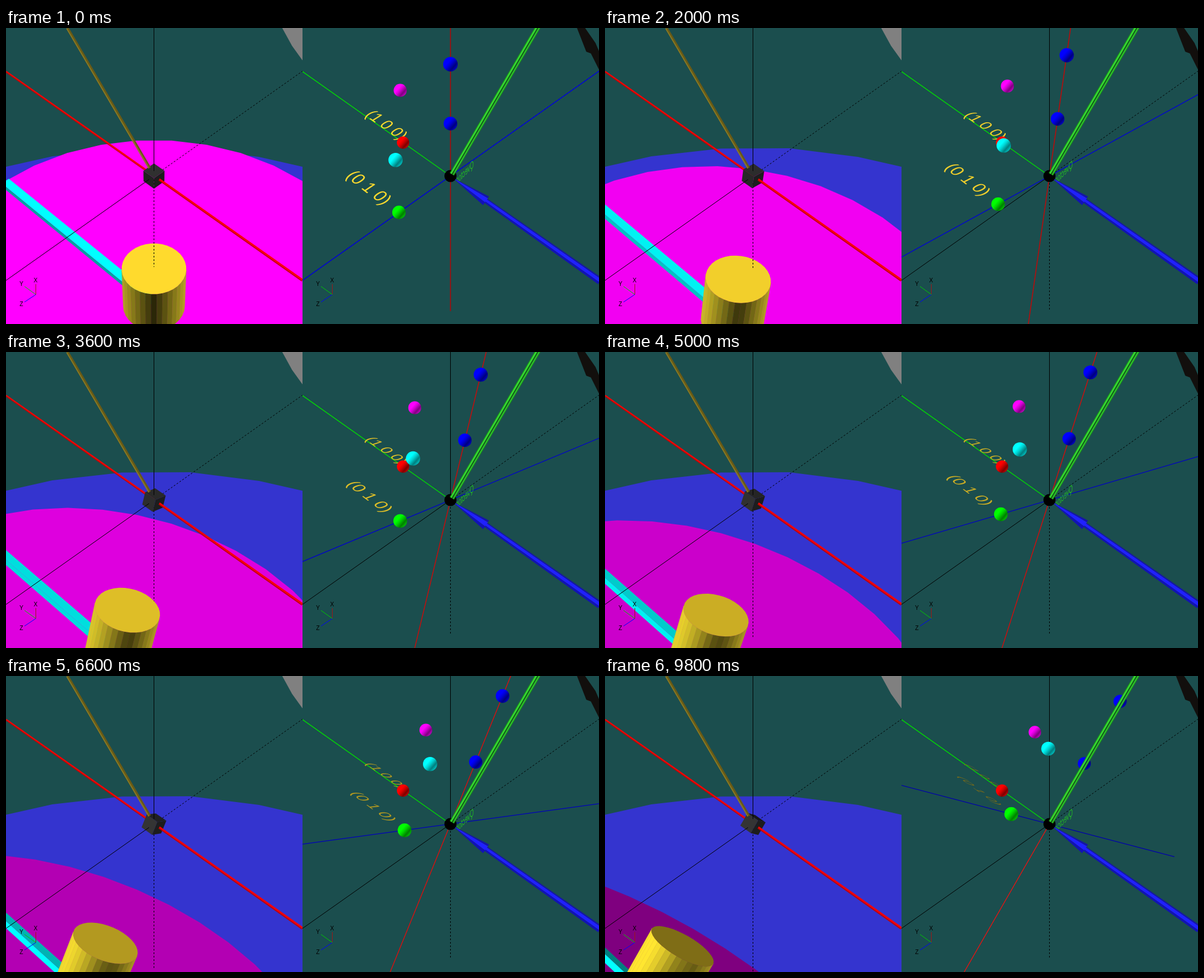
An HTML page with a canvas that plays this animation: 1024x512 px, repeating every 10000 ms.

```html
<!DOCTYPE html>
<html lang="en">
<head>
<meta charset="utf-8">
<title>Rotating frames</title>
<style>
html, body { margin: 0; width: 100%; height: 100%; overflow: hidden; background: #1b4e4e; }
canvas { display: block; width: 1024px; height: 512px; }
</style>
</head>
<body>
<canvas id="stage" width="1024" height="512"></canvas>
<script>
const g = document.getElementById('stage').getContext('2d');
const FOCAL = 1447, DIST = 12, H = Math.SQRT1_2, SIDES = 36;
const STEP = 200, STEPS = 50, STEP_DEG = 0.9;
const FONT = '"Liberation Sans", Arial, sans-serif';
const GOLD = [255, 218, 45];
let cx = 256, sin = 0, cos = 1;

// X points up, Y up-left away from the viewer, Z down-left towards the viewer
const depth = ([x, y, z]) => DIST - (H * x - y / 2 + z / 2);
function project(p) {
  const [x, y, z] = p, k = FOCAL / depth(p);
  return [cx - H * (y + z) * k, 256 - (H * x + (y - z) / 2) * k];
}
// turn a point about the Y axis
const turn = (x, y, z) => [x * cos + z * sin, y, z * cos - x * sin];
const spin = (x, y, z) => project(turn(x, y, z));
const shade = (rgb, k) => `rgb(${rgb.map(v => Math.round(v * Math.min(1, Math.max(0, k))))})`;

function poly(points, fill) {
  g.beginPath();
  points.forEach(p => g.lineTo(p[0], p[1]));
  g.closePath();
  g.fillStyle = fill;
  g.fill();
}
function line(a, b, color, width = 1, dash = []) {
  g.beginPath();
  g.setLineDash(dash);
  g.moveTo(a[0], a[1]);
  g.lineTo(b[0], b[1]);
  g.strokeStyle = color;
  g.lineWidth = width;
  g.stroke();
  g.setLineDash([]);
}
// round bar between two screen points, each with its own half width
function bar(a, b, ra, rb, layers) {
  const len = Math.hypot(b[0] - a[0], b[1] - a[1]);
  const nx = (a[1] - b[1]) / len, ny = (b[0] - a[0]) / len;
  for (const [from, to, color] of layers) {
    const at = (p, r, k) => [p[0] + nx * r * k, p[1] + ny * r * k];
    poly([at(a, ra, from), at(b, rb, from), at(b, rb, to), at(a, ra, to)], color);
  }
}
const axis = (a, b, dash) => line(project(a), project(b), '#000', 1, dash ? [3, 3] : []);

function panel(x, draw) {
  g.save();
  g.beginPath();
  g.rect(x, 0, 512, 512);
  g.clip();
  cx = x + 255.5;
  draw();
  triad(x);
  g.restore();
}
function triad(x) {
  const o = [x + 51.5, 461];
  line(o, [x + 51.5, 443], '#a01818');
  line(o, [x + 32, 447], '#0c0');
  line(o, [x + 32, 474], '#00f');
  g.fillStyle = '#000';
  g.font = '10px ' + FONT;
  g.textAlign = 'center';
  g.textBaseline = 'middle';
  g.fillText('X', x + 51, 437);
  g.fillText('Y', x + 26.5, 443.5);
  g.fillText('Z', x + 26.5, 478.5);
}

const topLight = () => 0.345 + 0.69 * cos - 0.49 * sin;
const sideLight = () => 0.27 + 0.9 * sin + 0.36 * cos;
function ring(x, r) {
  return Array.from({ length: SIDES }, (_, i) => {
    const a = i * 2 * Math.PI / SIDES;
    return [x, r * Math.cos(a), r * Math.sin(a)];
  });
}

function cylinder(top, bottom, r) {
  const up = ring(top, r), low = ring(bottom, r);
  for (let i = 0; i < SIDES; i++) {
    const j = (i + 1) % SIDES, a = (i + 0.5) * 2 * Math.PI / SIDES;
    const n = turn(0, Math.cos(a), Math.sin(a));
    const p = turn(top, r * Math.cos(a), r * Math.sin(a));
    const eye = [DIST * H - p[0], -DIST / 2 - p[1], DIST / 2 - p[2]];
    if (n[0] * eye[0] + n[1] * eye[1] + n[2] * eye[2] <= 0) continue;
    const left = Math.max(0, 0.69 * n[0] + 0.39 * (n[1] + n[2]));
    const right = Math.max(0, -0.39 * (n[1] + n[2]));
    const color = shade([255, 230, 48], 0.17 + left + right);
    const quad = [up[i], up[j], low[j], low[i]].map(q => spin(...q));
    poly(quad, color);
    g.strokeStyle = color;
    g.lineWidth = 0.5;
    g.stroke();
  }
  poly(up.map(q => spin(...q)), shade(GOLD, topLight()));
}

function cube(e) {
  const face = (pts, k) => poly(pts.map(p => spin(...p.map(v => v * e))), shade([52, 52, 52], k));
  face([[1, 1, 1], [1, -1, 1], [-1, -1, 1], [-1, 1, 1]], sideLight());
  face([[1, -1, 1], [1, -1, -1], [-1, -1, -1], [-1, -1, 1]], 0.55);
  face([[1, 1, 1], [1, 1, -1], [1, -1, -1], [1, -1, 1]], topLight() * 0.9);
}

function solids() {
  const PLATE = 3.09;
  poly([[477, 0], [512, 0], [512, 56], [494, 31]], '#808080');
  poly([[0, 240], [80, 222], [200, 208.5], [318, 208], [437, 223], [512, 240], [512, 512], [0, 512]], '#3434cf');
  poly(ring(-PLATE, 4.13).map(q => spin(...q)), shade([255, 0, 255], topLight()));

  const [top, low, len, w] = [-3, -3.11, 4.05, 0.085];
  poly([spin(top, 0, w), spin(top, len, w), spin(low, len, w), spin(low, 0, w)], shade([0, 255, 255], sideLight()));
  poly([spin(top, 0, w), spin(top, len, w), spin(top, len, -w), spin(top, 0, -w)], shade([0, 255, 255], topLight()));

  // the lower axis pierces the lid while the tilt is small, the plate afterwards
  const lid = 2.1 * sin / cos < 0.52;
  const drop = () => axis([0, 0, 0], [-(lid ? 2.07 : PLATE) / cos, 0, 0], true);
  if (!lid) drop();
  cylinder(-2.1, -PLATE, 0.52);
  if (lid) drop();

  axis([0, 0, 0], [0, 0, -8.2], true);
  const rod = [[-1, 0.3, '#f00'], [0.3, 1, '#c40000']];
  bar([0, 75.5], [256, 256], 1.6, 1.9, rod);
  cube(0.106);
  axis([0.1, 0, 0], [4, 0, 0]);
  axis([0, 0, 0.1], [0, 0, 5]);
  bar([106, 0], [248, 242], 2.3, 2.5, [[-1, 0.2, '#6b5a14'], [0.2, 1, '#8f7a1e']]);
  bar([264.5, 262], [512, 436.5], 2, 2.3, rod);
}

// lit from the upper left, with a weaker light on the lower right rim
function ball(p, rgb) {
  const [x, y] = project(p), r = 0.092 * FOCAL / depth(p);
  const dx = r * 0.75, dy = r * 0.66;
  const fill = g.createLinearGradient(x - dx, y - dy, x + dx, y + dy);
  fill.addColorStop(0, shade(rgb, 1));
  fill.addColorStop(0.3, shade(rgb, 1));
  fill.addColorStop(0.5, shade(rgb, 0.83));
  fill.addColorStop(0.78, shade(rgb, 0.5));
  fill.addColorStop(1, shade(rgb, 0.75));
  g.fillStyle = fill;
  g.beginPath();
  g.arc(x, y, r, 0, 7);
  g.fill();
}

// text lying flat in the turning Y-Z plane
function label(text, y, z) {
  g.save();
  g.font = '100px ' + FONT;
  g.textAlign = 'left';
  g.textBaseline = 'alphabetic';
  const px = 0.0028, w = g.measureText(text).width;
  const a = spin(0, y, z), b = spin(0, y - w * px, z);
  const mid = y - w * px / 2;
  const up = spin(0, mid, z - 0.1), down = spin(0, mid, z + 0.1), k = px / 0.2;
  g.transform((b[0] - a[0]) / w, (b[1] - a[1]) / w, (down[0] - up[0]) * k, (down[1] - up[1]) * k, a[0], a[1]);
  g.fillStyle = shade(GOLD, topLight());
  g.fillText(text, 0, 0);
  g.restore();
}

function frames() {
  const FLOOR = 3.27;
  poly([[986, 0], [1000, 0], [1018, 26], [1024, 40], [1024, 72], [1010, 44], [1002, 41]], '#120f0d');
  axis([0, 0, 0], [4, 0, 0]);
  axis([0, 0, 0], [-FLOOR, 0, 0], true);
  axis([0, 0, 0], [0, 0, 5]);
  axis([0, 0, 0], [0, 0, -8.2], true);

  const back = sin ? Math.min(8, FLOOR / sin) : 8;
  line(spin(0, 0, 6), spin(0, 0, -back), shade([0, 0, 225], 1 - 0.35 * sin), 1.3);
  line(spin(5, 0, 0), spin(-FLOOR / cos, 0, 0), shade([255, 12, 12], 0.68 + 0.45 * sin), 1.6 - 0.6 * sin);
  line(project([0, 8, 0]), project([0, 0, 0]), '#0d0', 1.3);

  label('(1 0 0)', 1.88, 0);
  label('(0 1 0)', 1.06, 1.07);

  const balls = [
    [[0, 1, 0], [255, 0, 0]], [[0, 0, 1], [0, 255, 0]],
    [[1, 0, 0], [0, 0, 255]], [[2, 0, 0], [0, 0, 255]],
    [[1, 1, 0], [255, 0, 255]], [[1, 0, 1], [0, 255, 255]]
  ].map(([p, rgb]) => [turn(...p), rgb]);
  balls.sort((a, b) => depth(b[0]) - depth(a[0]));
  balls.forEach(([p, rgb]) => ball(p, rgb));

  g.save();
  g.transform(-0.55, 0.55, 0.1, 1.15, 808, 240);
  g.font = '15px ' + FONT;
  g.textAlign = 'left';
  g.textBaseline = 'alphabetic';
  g.fillStyle = '#24bc24';
  g.fillText('Qvector', 0, 0);
  g.restore();

  const blue = [[-1, -0.6, '#1414a8'], [-0.6, 0.35, '#2020ff'], [0.35, 1, '#1212b4']];
  bar([826, 297], [1026, 438], 4.4, 6.2, blue);
  bar([774, 261], [829, 299], 0.5, 9, blue);

  g.fillStyle = '#000';
  g.beginPath();
  g.arc(767.5, 256, 10.5, 0, 7);
  g.fill();
  bar([770, 253], [919, -2], 4.4, 4.6, [
    [-1, -0.75, '#1c8c1c'], [-0.75, -0.1, '#34d82f'], [-0.1, 0.3, '#125f12'], [0.3, 0.8, '#2cc428'], [0.8, 1, '#1c8c1c']
  ]);
}

function render(ms) {
  const step = Math.floor((ms % (STEP * STEPS)) / STEP);
  const angle = step * STEP_DEG * Math.PI / 180;
  sin = Math.sin(angle);
  cos = Math.cos(angle);
  g.fillStyle = '#1b4e4e';
  g.fillRect(0, 0, 1024, 512);
  panel(0, solids);
  panel(512, frames);
}

const start = performance.now();
function tick() {
  render(Math.max(0, performance.now() - start));
  requestAnimationFrame(tick);
}
tick();
</script>
</body>
</html>
```
